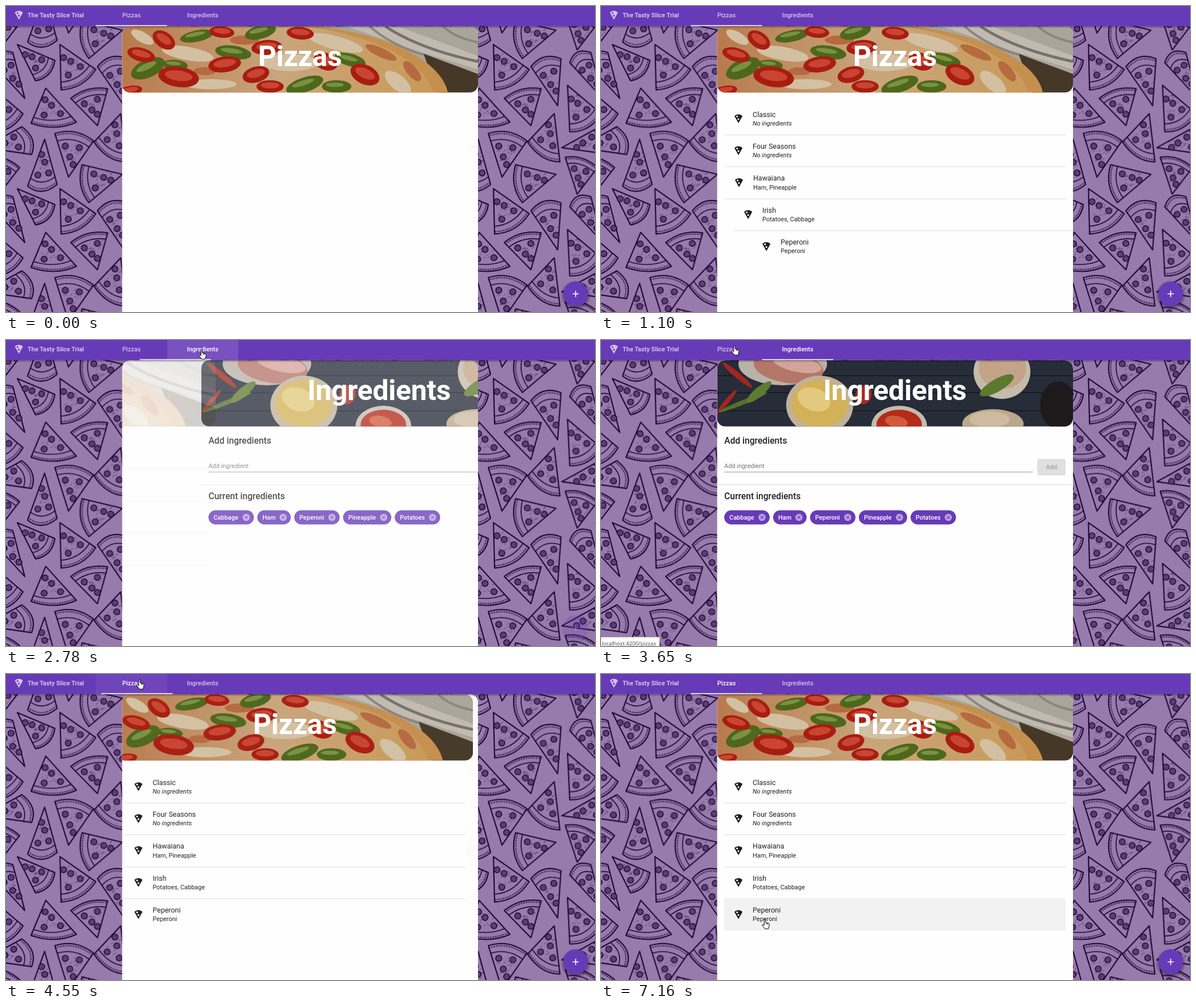
These frames come from a looping animation (1037 by 540 pixels, 7190 ms). An HTML page:

```html
<!DOCTYPE html>
<html lang="en">
<head>
<meta charset="utf-8">
<title>Pizzas</title>
<style>
  html, body { margin: 0; width: 100%; height: 100%; overflow: hidden; background: #977bac; }
  svg { position: absolute; left: 0; top: 0; }
  #back { will-change: transform; }
  text { font-family: Roboto, Arial, sans-serif; font-size: 10.96px; fill: #212121; }
  .m { font-weight: 500; }
  .w { fill: #fff; }
  .title { font-size: 12.53px; }
  .h1 { font-size: 50.1px; font-weight: 700; letter-spacing: -.3px; text-anchor: middle; fill: #fff; }
  .h2 { font-size: 15.67px; font-weight: 500; }
  .mid { text-anchor: middle; }
  .url { font-family: "Open Sans", "Noto Sans", sans-serif; font-size: 9.65px; fill: #444; }
</style>
</head>
<body>
<svg id="back" width="1037" height="540"></svg>
<svg id="ui" width="1037" height="540"></svg>
<script>
const LOOP = 7190, TILE = 254.4, SLIDE = 601, PITCH = 56.4, TOP = 171;
const $ = id => document.getElementById(id);
const clamp = v => Math.max(0, Math.min(1, v));
const mix = (a, b, u) => a + (b - a) * u;

/* ---------- wallpaper ---------- */
let seed = 7;
const rnd = () => (seed = seed * 16807 % 2147483647) / 2147483647;

// tip, then both ends of the crust
const slices = [
  [20, 68, 86, 96, 52, 132], [95, 68, 158, 112, 97, 148], [208, 176, 161, 107, 214, 93],
  [70, 145, 124, 205, 44, 207], [161, 211, 114, 163, 179, 146], [-29, 140, 30, 190, -25, 222],
  [-39, 250, 28, 213, 45, 262], [68, 235, 90, 315, 38, 318], [110, 302, 86, 225, 154, 238],
  [202, 190, 212, 275, 155, 240], [-12, 332, -33, 267, 24, 285], [205, 297, 134, 280, 146, 347],
  [33, 163, -25, 100, 12, 82]
];

function slice([tx, ty, ax, ay, bx, by]) {
  // depth: 0 tip, 1 crust; side: 0..1 across
  const at = (depth, side) => [
    mix(tx, mix(ax, bx, side), depth).toFixed(1),
    mix(ty, mix(ay, by, side), depth).toFixed(1)
  ];
  const arc = (d, bulge) => `${at(d, 0)}Q${at(d + bulge, .5)} ${at(d, 1)}`;
  let s = `<path d="M${tx},${ty}L${arc(1, .26)}Z" stroke-width="2.1"/>` +
    `<path d="M${arc(.83, .2)}" stroke-width="1.6"/>` +
    `<path d="M${arc(.95, .25)}" stroke-width="2.5" stroke-dasharray="1 3.5" opacity=".65"/>`;
  let hatch = '';
  for (let i = 0; i < 20; i++) {
    const [x, y] = at(.3 + rnd() * .5, .12 + rnd() * .76);
    hatch += `M${x},${y}l3,-2`;
  }
  s += `<path d="${hatch}" stroke-width=".7" opacity=".75"/>`;
  for (const [d, side] of [[.74, .24], [.77, .72], [.5, .42], [.33, .72]]) {
    const [x, y] = at(d, side);
    s += `<circle cx="${x}" cy="${y}" r="5.3" fill="url(#lines)" stroke-width="1.5"/>`;
  }
  return s;
}

$('back').innerHTML = `<defs>
  <pattern id="lines" width="2.4" height="2.4" patternUnits="userSpaceOnUse" patternTransform="rotate(35)">
    <rect width="2.4" height="2.4" fill="#8465a0"/><rect width="2.4" height="1.1" fill="#2b0f45"/></pattern>
  <g id="set" fill="none" stroke="#1c0232" stroke-linejoin="round" stroke-linecap="round">${slices.map(slice).join('')}</g>
  <pattern id="tile" width="${TILE}" height="${TILE}" patternUnits="userSpaceOnUse">
    ${[0, TILE].map(x => [0, -TILE].map(y => `<use href="#set" x="${x}" y="${y}"/>`).join('')).join('')}
  </pattern></defs>
  <rect width="1037" height="540" fill="#977bac"/><rect width="1037" height="540" fill="url(#tile)"/>`;

/* ---------- parts ---------- */
const text = (x, y, cls, str, extra = '') => `<text x="${x}" y="${y}" class="${cls}" ${extra}>${str}</text>`;
const rect = (x, y, w, h, fill, extra = '') => `<rect x="${x}" y="${y}" width="${w}" height="${h}" fill="${fill}" ${extra}/>`;
const blob = (x, y, rx, ry, rot, fill) =>
  `<ellipse cx="${x}" cy="${y}" rx="${rx}" ry="${ry}" transform="rotate(${rot} ${x} ${y})" fill="${fill}"/>`;
const wedge = (x, y, fill) => `<path transform="translate(${x} ${y}) scale(.783)" fill="${fill}" d="M12 2C8.43 2 5.23 3.54 3.01 6L12 22l8.99-16C18.78 3.55 15.57 2 12 2zM7 7c0-1.1.9-2 2-2s2 .9 2 2-.9 2-2 2-2-.9-2-2zm5 8c-1.1 0-2-.9-2-2s.9-2 2-2 2 .9 2 2-.9 2-2 2z"/>`;

const tomatoes = [
  [380, 46, 22, 10, 5], [278, 60, 22, 14, 35], [238, 86, 25, 12, 15], [304, 125, 36, 18, 8],
  [385, 103, 29, 14, -8], [459, 73, 27, 13, -5], [518, 48, 24, 11, 5], [440, 121, 24, 14, -15],
  [465, 142, 24, 11, 0], [563, 98, 22, 15, 20], [632, 121, 27, 17, 25], [218, 150, 22, 9, -10]
];
const basil = [
  [250, 110, 32, 16, -25], [298, 104, 22, 9, 5], [336, 53, 30, 10, -12], [400, 82, 32, 12, 8],
  [448, 46, 28, 12, -15], [526, 139, 34, 13, -18], [582, 142, 26, 11, 0], [606, 95, 28, 11, 15]
];
const pizzaPhoto = rect(204, 36, 628, 117, '#aaa59b') +
  '<path d="M600 36L690 36 831 88V112L720 78Z" fill="#c0bab0"/><path d="M668 36q60 40 163 62" stroke="#77716b" stroke-width="5" fill="none"/>' +
  '<path d="M640 36q40 34 95 50M770 36q20 20 61 28" stroke="#8b857d" stroke-width="4" fill="none"/>' +
  '<path d="M735 84L831 120V153H760Z" fill="#453826"/>' +
  '<path d="M204 36H550C660 48 765 92 778 153H204Z" fill="#c58f4e"/>' +
  '<path d="M204 36H530C640 52 738 94 752 153H204Z" fill="url(#cheese)"/>' +
  [[320, 84, 46, 12, 10], [500, 100, 50, 15, 0], [580, 65, 50, 12, 15], [360, 138, 46, 9, 0], [690, 135, 28, 13, 40], [240, 55, 22, 9, 30]]
    .map(b => blob(...b, '#d3c0a2')).join('') +
  [[660, 82, 30, 8, 25], [715, 115, 22, 9, 50], [420, 60, 26, 8, 0], [350, 115, 20, 7, 0]]
    .map(b => blob(...b, '#b56a3f')).join('') +
  basil.map(b => blob(...b, '#4d671c') + blob(b[0] - 3, b[1] - 3, b[2] * .6, b[3] * .35, b[4], '#7a9140')).join('') +
  tomatoes.map(b => blob(...b, '#a81d12') + blob(b[0], b[1] - 2, b[2] * .68, b[3] * .5, b[4], '#c9452f')).join('');

const foodPhoto = rect(204, 36, 628, 117, '#262c38') +
  [62, 92, 124].map(y => rect(204, y, 628, 2, '#171b24')).join('') +
  blob(320, 42, 78, 38, 0, '#b9b2a8') + blob(330, 48, 62, 28, 8, '#b5766a') + blob(345, 42, 44, 14, 12, '#d3a598') +
  blob(240, 62, 34, 5, 40, '#a3261c') + blob(222, 108, 26, 4, -50, '#a3261c') + blob(250, 110, 46, 4, -22, '#566f2c') +
  blob(278, 92, 28, 8, -40, '#5f7a31') +
  blob(385, 115, 59, 52, 0, '#bfb19a') + blob(385, 112, 50, 42, 0, '#d2b159') + blob(375, 105, 30, 20, 20, '#e2c97d') +
  blob(462, 97, 14, 17, 20, '#a82a1d') +
  blob(525, 152, 49, 36, 0, '#c4bcae') + blob(525, 149, 40, 26, 0, '#b32c1b') + blob(520, 144, 20, 10, 10, '#d05a3c') +
  blob(706, 56, 50, 48, 0, '#c4bbaa') + blob(707, 50, 42, 36, 0, '#c3a488') + blob(697, 80, 34, 11, -30, '#5b792f') +
  blob(690, 148, 54, 26, 0, '#bba78a') + blob(684, 140, 36, 14, 0, '#cdbb9f') + blob(805, 115, 32, 42, 0, '#1d1a1b');

const banner = (photo, label) => `<g clip-path="url(#round)">${photo}</g>` + text(517.4, 105.5, 'h1', label);

const menu = [['Classic'], ['Four Seasons'], ['Hawaiana', 'Ham, Pineapple'], ['Irish', 'Potatoes, Cabbage'], ['Peperoni', 'Peperoni']];
const rows = menu.map(([name, parts], i) => {
  const y = TOP + i * PITCH;
  return `<g id="row${i}">` + rect(217, y, SLIDE, PITCH, '#f2f2f2', `id="hover${i}"`) +
    (i < 4 ? rect(217, Math.round(y + 56), SLIDE, 1, '#dedede') : '') +
    wedge(232.6, y + 18.6, '#1c1c1c') + text(267, y + 24.6, 'title', name) +
    text(267, y + 39.7, '', parts || 'No ingredients', parts ? '' : 'font-style="italic"') + '</g>';
}).join('');

const chips = [['Cabbage', 217, 80], ['Ham', 303, 59], ['Peperoni', 368, 80], ['Pineapple', 454, 85], ['Potatoes', 545, 80]]
  .map(([name, x, w]) => {
    const c = x + w - 13.5;
    return rect(x, 300.5, w, 25, '#673ab7', 'rx="12.5"') + text(x + 9, 316.5, 'm w', name) +
      `<circle cx="${c}" cy="313" r="6.3" fill="#b9a5de"/><path d="M${c - 2.6} 310.4l5.2 5.2m0-5.2l-5.2 5.2" stroke="#673ab7" stroke-width="1.2"/>`;
  }).join('');

$('ui').innerHTML = `<defs>
  <clipPath id="card"><path d="M204.5 540V50a14 14 0 0 1 14-14H817a14 14 0 0 1 14 14V540Z"/></clipPath>
  <clipPath id="round"><rect x="204.5" y="36" width="626.5" height="116.5" rx="14"/></clipPath>
  <clipPath id="tabA"><rect x="158" width="126" height="35.5"/></clipPath>
  <clipPath id="tabB"><rect x="284" width="125" height="35.5"/></clipPath>
  <linearGradient id="cheese"><stop offset="0" stop-color="#b87a4c"/><stop offset=".5" stop-color="#c9a57c"/><stop offset="1" stop-color="#c99a58"/></linearGradient>
  <linearGradient id="shade" x2="0" y2="1"><stop offset="0" stop-opacity=".35"/><stop offset="1" stop-opacity="0"/></linearGradient>
  <radialGradient id="glow"><stop offset=".72" stop-opacity=".4"/><stop offset="1" stop-opacity="0"/></radialGradient></defs>
<g clip-path="url(#card)">${rect(204, 36, 628, 504, '#fefefe')}
  <g id="foods">${banner(foodPhoto, 'Ingredients')}
    ${text(217, 183, 'h2', 'Add ingredients')}${text(217, 226.2, '', 'Add ingredient', 'fill-opacity=".62"')}
    ${rect(217, 232.5, 543.5, 1, '#949494')}${rect(768, 210, 50, 29, '#e0e0e0', 'rx="3"')}
    ${text(793, 227.8, 'm mid', 'Add', 'fill-opacity=".32"')}
    ${rect(204, 255, 628, 1, '#dedede')}${text(217, 280.8, 'h2', 'Current ingredients')}${chips}</g>
  <g id="pizzas">${banner(pizzaPhoto, 'Pizzas')}${rows}${rect(818, 248, 13, 1, '#dedede', 'id="stub"')}</g>
</g>
<g id="fab"><circle cx="1003" cy="511" r="27" fill="url(#glow)"/><circle cx="1003" cy="508" r="22" fill="#673ab7"/>
  <path d="M997.5 508h11M1003 502.5v11" stroke="#fff" stroke-width="1.7"/></g>
${rect(0, 35.5, 1037, 4, 'url(#shade)')}${rect(0, 0, 1037, 35.5, '#673ab7')}
<g clip-path="url(#tabB)"><circle id="rippleB" cx="344" cy="17" fill="#fff"/></g>
<g clip-path="url(#tabA)"><circle id="rippleA" cx="235" cy="10" fill="#fff"/></g>
<g opacity=".7">${wedge(13.3, 7, '#fff')}${text(38, 19.7, 'w', 'The Tasty Slice Trial', 'font-weight="700"')}</g>
${text(221, 19.6, 'm w mid', 'Pizzas', 'id="nameA"')}${text(346.3, 19.6, 'm w mid', 'Ingredients', 'id="nameB"')}
<rect id="bar" y="33.8" width="125.5" height="1.6" fill="#fff"/>
<g id="link">${'<rect id="linkBox" x="-1" y="524.5" height="17" fill="#fff" stroke="#c4c4c4"/>'}${text(1, 538.5, 'url', '', 'id="linkText"')}</g>
<g id="cursor" fill="#fff" stroke="#000" stroke-linejoin="round">
  <path id="hand" d="M4.3 2C4.3.5 6.7.5 6.7 2V6.6L11.6 7.8C13 8.2 13.6 9 13.4 10.4L12.5 15 11.6 17.7H5.6L1.1 11.9C.2 10.5 1.6 9.4 2.8 10.3L4.3 11.8ZM8.8 7.3V10M11 7.9V10.3"/>
  <path id="arrow" d="M.5.5V15.2L4 11.9 6.3 17.2 8.6 16.2 6.3 11.1H11.2Z"/></g>`;

/* ---------- motion ---------- */
function bezier(x1, y1, x2, y2) {
  const f = (s, a, b) => 3 * s * (1 - s) ** 2 * a + 3 * s * s * (1 - s) * b + s ** 3;
  return x => {
    if (x <= 0 || x >= 1) return clamp(x);
    let lo = 0, hi = 1;
    for (let i = 0; i < 24; i++) {
      const s = (lo + hi) / 2;
      if (f(s, x1, x2) < x) lo = s; else hi = s;
    }
    return f(lo, y1, y2);
  };
}
const ease = bezier(.25, .1, .25, 1), swift = bezier(.35, 0, .25, 1), out = bezier(0, 0, .2, 1);
const span = (t, from, len, fn = u => u) => fn(clamp((t - from) / len));

// smooth monotone curve through [time, value] points
function curve(pts) {
  const slope = i => (pts[i + 1][1] - pts[i][1]) / (pts[i + 1][0] - pts[i][0]);
  const tan = pts.map((p, i) => {
    if (i === 0) return slope(0);
    if (i === pts.length - 1) return 0;
    const a = slope(i - 1), b = slope(i);
    return 2 * a * b / (a + b);
  });
  return t => {
    if (t <= pts[0][0]) return pts[0][1];
    const i = pts.findIndex(p => p[0] > t) - 1;
    if (i < 0) return pts[pts.length - 1][1];
    const h = pts[i + 1][0] - pts[i][0], u = (t - pts[i][0]) / h, v = 1 - u;
    return v * v * (1 + 2 * u) * pts[i][1] + u * v * v * h * tan[i] +
      u * u * (1 + 2 * v) * pts[i + 1][1] - u * u * v * h * tan[i + 1];
  };
}
const rowShift = curve([[20, 601], [520, 575], [720, 235], [900, 50], [950, 17.5], [1000, 1], [1020, 0]]);

// start, end, place reached
const moves = [
  [1360, 2070, 339, 16], [3030, 3650, 229.5, 9], [5290, 5910, 277.5, 254.5],
  [6010, 6720, 281, 386.5], [6750, 7160, 283, 432]
];
function pointer(t) {
  let x = 941, y = 532;
  for (const [a, b, mx, my] of moves) {
    const u = Math.sin(span(t, a, b - a) * Math.PI / 2);
    x = mix(x, mx, u);
    y = mix(y, my, u);
  }
  return [x, y];
}

const set = (id, attrs) => { for (const k in attrs) $(id).setAttribute(k, attrs[k]); };
const show = (id, on) => set(id, { visibility: on ? 'visible' : 'hidden' });

function ripple(id, t, start, radius) {
  set(id, { r: radius * span(t, start, 450, out), opacity: .13 * (1 - span(t, start + 400, 260)) });
}

function draw(t) {
  const page = 1 - span(t, 2580, 430, ease) + span(t, 4130, 500, ease);
  const ink = span(t, 2590, 470, swift) - span(t, 4165, 565, swift);
  set('pizzas', { transform: `translate(${-SLIDE * (1 - page)} 0)`, opacity: page });
  set('foods', { transform: `translate(${SLIDE * page} 0)`, opacity: 1 - page });
  set('fab', { opacity: page });
  set('bar', { x: 158 + 125.5 * ink });
  ripple('rippleB', t, 2360, 68);
  ripple('rippleA', t, 4000, 82);
  set('nameA', { opacity: t >= 3970 ? 1 : .7 });
  set('nameB', { opacity: t >= 2310 && t < 3970 ? 1 : .7 });

  const [x, y] = pointer(t), tipX = x + 5, tipY = y + 1, visible = t >= 1360;
  const row = visible && page === 1 && tipX > 217 && tipX < 818 ? Math.floor((tipY - TOP) / PITCH) : -1;
  const onRow = row >= 0 && row < 5;
  const onTab = tipY < 35.5 && tipX > 158 && tipX < 409;
  menu.forEach((_, i) => {
    const own = t - 50 * i;
    set('row' + i, { transform: `translate(${rowShift(own)} 0)` });
    show('row' + i, own >= 20);
    show('hover' + i, i === row);
  });
  show('stub', t < 20);
  set('cursor', { transform: `translate(${x} ${y})` });
  show('hand', visible && (onRow || onTab));
  show('arrow', visible && !onRow && !onTab);

  const second = t > 3030;
  $('linkText').textContent = 'localhost:4200/' + (second ? 'pizzas' : 'ingredients');
  set('linkBox', { width: second ? 104 : 129 });
  set('link', { opacity: second
    ? span(t, 3500, 120) - span(t, 4030, 280)
    : span(t, 1950, 120) - span(t, 2400, 280) });
}

const begin = performance.now();
function tick() {
  draw((performance.now() - begin) % LOOP);
  requestAnimationFrame(tick);
}
tick();
</script>
</body>
</html>
```
